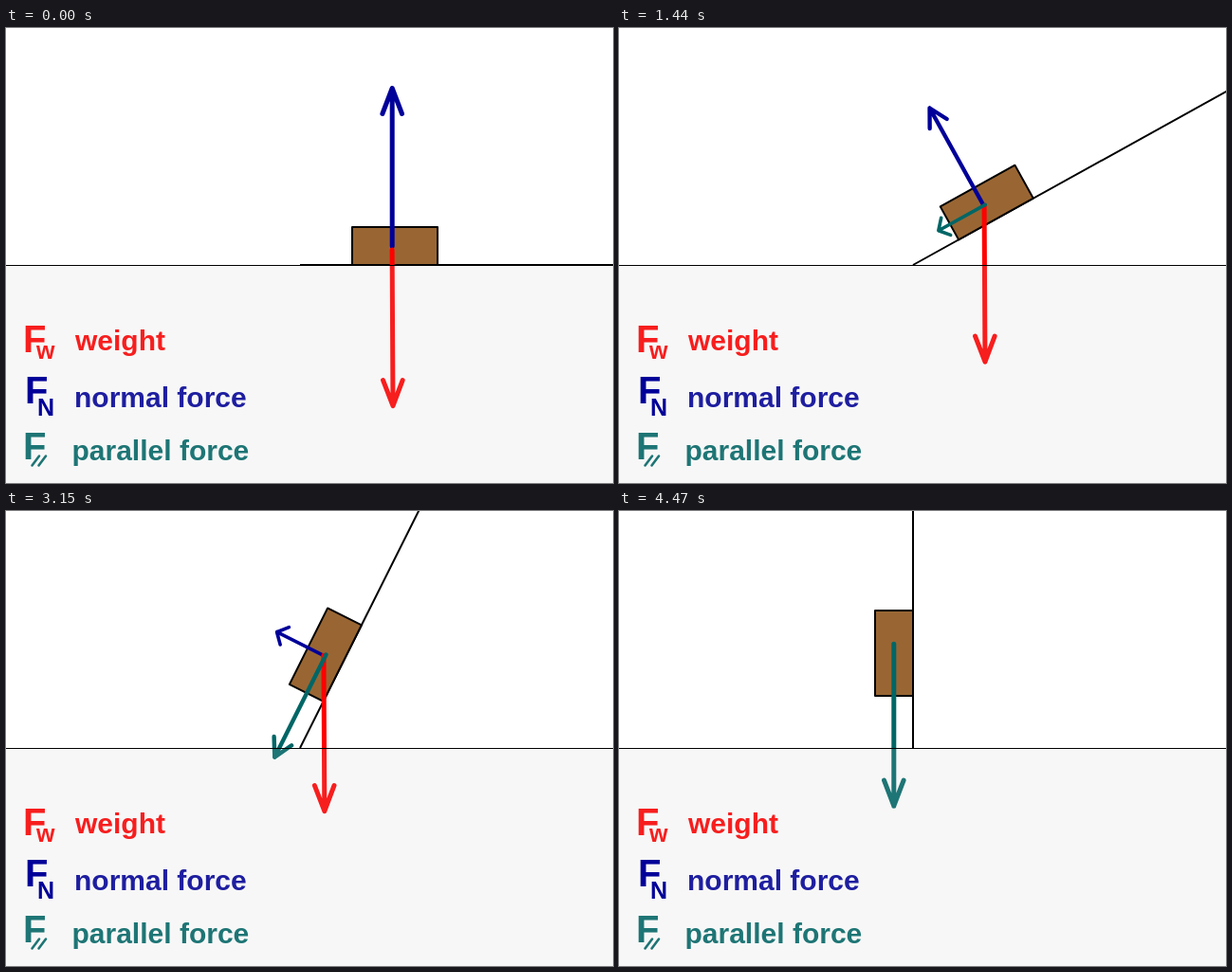
Animation of 640 by 480 pixels, one loop 4500 ms. Source, as an HTML page:

```html
<!DOCTYPE html>
<html lang="en">
<head>
<meta charset="utf-8">
<title>Forces on an incline</title>
<style>
  html, body { margin: 0; width: 100%; height: 100%; overflow: hidden; background: #fff; }
  svg { display: block; width: 640px; height: 480px; }
  text { font: bold 30px "Liberation Sans", Arial, sans-serif; }
  .big { font-size: 40px; }
  .sub { font-size: 25px; }
  .arrow { fill: none; stroke-linecap: round; stroke-linejoin: round; }
</style>
</head>
<body>
<svg viewBox="0 0 640 480">
  <g id="ramp" stroke="#000" stroke-width="2">
    <path d="M0 0H700"/>
    <rect x="55" y="-40" width="90" height="40" fill="#963" stroke-linejoin="round"/>
  </g>
  <path id="normal" class="arrow" stroke="#009"/>
  <path id="weight" class="arrow" stroke="#f00" stroke-width="5"/>
  <path id="parallel" class="arrow" stroke="#066"/>

  <g fill="#f00">
    <text class="big" x="18" y="341.5">F</text>
    <text class="sub" x="32" y="349">w</text>
    <text x="73" y="340">weight</text>
  </g>
  <text x="72" y="400" fill="#009">normal force</text>
  <g fill="#066">
    <text class="big" x="18" y="454.5">F</text>
    <text x="69.5" y="456">parallel force</text>
    <path d="M27.5 461.5l7.5-10M34.5 461.5l7.5-10" stroke="#066" stroke-width="2.6" stroke-linecap="round"/>
  </g>

  <!-- translucent ground tints everything below the horizon -->
  <rect y="250" width="640" height="230" fill="#c8c8c8" fill-opacity=".15"/>
  <rect y="250" width="640" height="1"/>
  <g fill="#009">
    <text class="big" x="20" y="396">F</text>
    <text class="sub" x="33" y="408.5">N</text>
  </g>
</svg>
<script>
const STEP = 30, COUNT = 150, PIVOT = [310, 250], HEAD = 27, WING = 10.3;
const [ramp, normal, weight, parallel] =
  ['ramp', 'normal', 'weight', 'parallel'].map(id => document.getElementById(id));

// Arrow whose head length shrinks with the shaft
function arrow(el, x1, y1, x2, y2, scale, visible = true) {
  const len = Math.hypot(x2 - x1, y2 - y1) || 1;
  const ux = (x2 - x1) / len, uy = (y2 - y1) / len;
  const wing = side => [
    x2 - ux * HEAD * scale - uy * WING * side,
    y2 - uy * HEAD * scale + ux * WING * side
  ].map(v => v.toFixed(2)).join(' ');
  el.setAttribute('d', `M${x1} ${y1}L${x2} ${y2}M${wing(-1)}L${x2} ${y2}L${wing(1)}`);
  el.setAttribute('visibility', visible ? 'visible' : 'hidden');
}

function draw(step) {
  const t = step / (COUNT - 1), a = t * Math.PI / 2;
  const first = step === 0, last = step === COUNT - 1;
  const tilt = `translate(${PIVOT}) rotate(${-90 * t})`;
  for (const el of [ramp, normal, parallel]) el.setAttribute('transform', tilt);

  // block centre is (100, -20) along the ramp
  const cx = PIVOT[0] + 100 * Math.cos(a) - 20 * Math.sin(a);
  const cy = PIVOT[1] - 100 * Math.sin(a) - 20 * Math.cos(a);
  const slip = 0.8 + 7 * t - 17.6 * t ** 3;

  const nx = 98 - slip, nTip = 166.5 - 156 * t;
  arrow(normal, nx, -20 - 1.5 * t, nx, -20 - nTip, nTip / 166.5, !last);
  normal.setAttribute('stroke-width', 5 - 2 * t);

  const wx = cx - 2 + 2 * t * t, wy = cy + 168.6 - 8.6 * t ** 2.5;
  arrow(weight, wx - 0.9, wy - 164.5, wx, wy, 1, !last);

  const px = 100 - slip, py = -18 - 2.2 * t, pLen = 2 + 169 * t;
  arrow(parallel, px, py, px - pLen, py, pLen / 171, !first);
  parallel.setAttribute('stroke-width', 3 + 2 * t);
}

function tick() {
  draw(Math.floor(performance.now() / STEP) % COUNT);
  requestAnimationFrame(tick);
}
tick();
</script>
</body>
</html>
```
